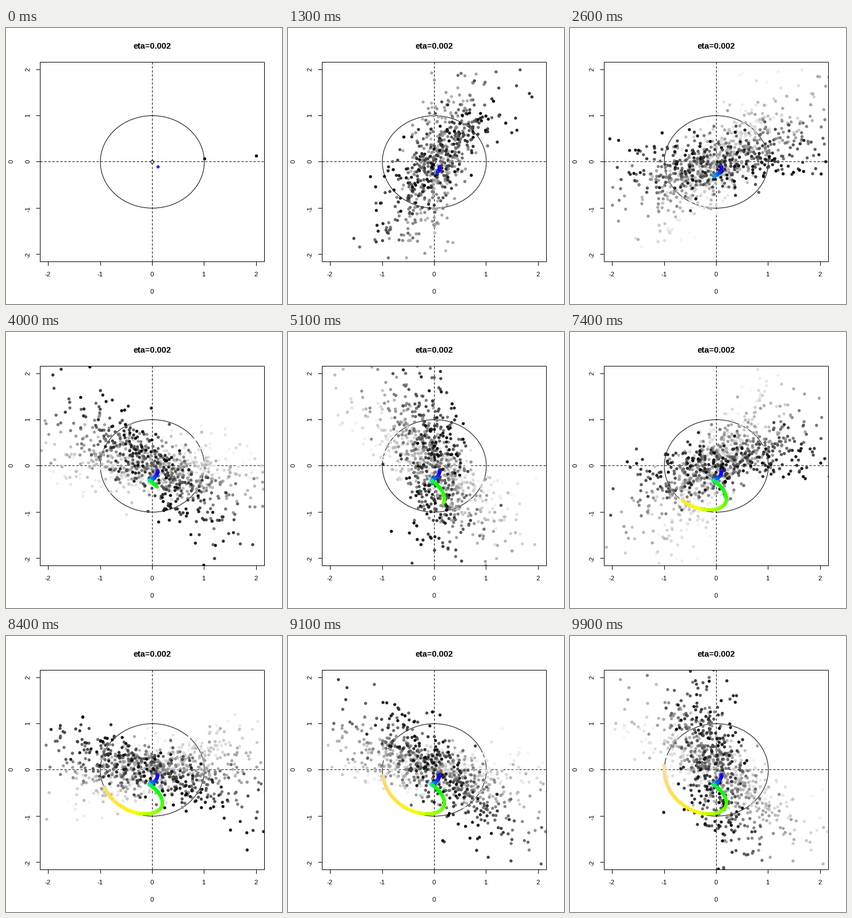
Animation, 480 px wide and 480 px high, one loop 10000 ms. Source, as a matplotlib script:

```python
import colorsys

import matplotlib.pyplot as plt
import numpy as np
from matplotlib.animation import FuncAnimation
from matplotlib.patches import Ellipse, Rectangle

SIZE, DPI = 480, 100
FRAMES, STEP_MS = 100, 100
ETA = 0.002
PER_FRAME, WINDOW = 50, 20      # new samples per frame, frames a sample stays
STRIDE = 5                      # draw every fifth weight update
SPREAD = np.array([1.0, 0.28])  # deviation along and across the main axis
START = (0.1, -0.1)
PX = 72 / DPI                   # one pixel in points

LEFT, TOP, RIGHT, BOTTOM = 59, 59, 449, 406
CX, CY, UX, UY = 254.5, 232.9, 90.4, 80.4


def to_px(points):
    return np.asarray(points) * (UX, -UY) + (CX, CY)


def axis_at(t):
    """Unit vectors along and across the cloud, turning once per loop."""
    a = np.pi / 2 - 2 * np.pi * np.asarray(t) / FRAMES
    c, s = np.cos(a), np.sin(a)
    return np.stack([c, s], axis=-1), np.stack([-s, c], axis=-1)


def learn():
    """Oja's rule, driven by the expected covariance of the cloud."""
    w = np.array(START)
    path = [w]
    for k in range((FRAMES - 1) * PER_FRAME):
        along, across = axis_at(k / PER_FRAME)
        cw = SPREAD[0] ** 2 * (along @ w) * along + SPREAD[1] ** 2 * (across @ w) * across
        w = w + ETA * (cw - (w @ cw) * w)
        path.append(w)
    return np.array(path)[::STRIDE]


def topo(p):
    """Violet to cyan, green to yellow, yellow to cream."""
    part = min(int(p * 3), 2)
    u = p * 3 - part
    hue = (43 - 12 * u, 23 - 12 * u, 10 - 4 * u)[part]
    return colorsys.hsv_to_rgb(hue / 60, 1 - 0.7 * u * (part == 2), 1)


rng = np.random.default_rng(7)
born = 1 + np.arange((FRAMES - 1) * PER_FRAME) / PER_FRAME
along, across = axis_at(born)
draws = rng.normal(0, SPREAD, (born.size, 2))
cloud = to_px(draws[:, :1] * along + draws[:, 1:] * across)

path = to_px(learn())
path_colors = np.array([topo(p) for p in np.linspace(0, 1, len(path))])
first_dots = to_px([(k, 0.07 * k) for k in (1, 2)])

fig = plt.figure(figsize=(SIZE / DPI, SIZE / DPI), dpi=DPI, facecolor="white")
ax = fig.add_axes([0, 0, 1, 1])
ax.set(xlim=(0, SIZE), ylim=(SIZE, 0))
ax.axis("off")


def line(x, y, **kw):
    ax.plot(x, y, color="black", lw=PX, solid_capstyle="butt", **kw)


def label(x, y, text, size=11.4, **kw):
    ax.text(x, y, text, family="Liberation Sans", fontsize=size * PX,
            ha="center", va="center_baseline", **kw)


# Straight lines sit on whole pixels, which the renderer snaps to
frame = Rectangle((LEFT, TOP), RIGHT - LEFT, BOTTOM - TOP, fill=False,
                  ec="black", lw=PX, zorder=6)
ax.add_patch(frame)
for v in range(-2, 3):
    tx, ty = int(CX + UX * v), int(CY - UY * v)
    line([tx, tx], [BOTTOM, BOTTOM + 7])
    line([LEFT - 7, LEFT], [ty, ty])
    label(tx - 0.5, 428.5, str(v))
    label(38.5, ty + 0.5, str(v), rotation=90)
label(254, 457.5, "0")
label(9.5, 232.5, "0", rotation=90)
label(254, 30, "eta=0.002", size=14.4, weight="bold")

dash = dict(dashes=(4, 3), dash_capstyle="butt", zorder=2)
line([int(CX)] * 2, [BOTTOM, TOP], **dash)
line([LEFT, RIGHT], [int(CY)] * 2, **dash)
ax.add_patch(Ellipse((CX, CY), 2 * UX, 2 * UY, fill=False, ec="black",
                     lw=PX, zorder=2))
ax.scatter([CX], [CY], s=(5.5 * PX) ** 2, facecolors="none",
           edgecolors="black", linewidths=PX, zorder=2)

dots = ax.scatter([], [], s=(5.4 * PX) ** 2, linewidths=0, zorder=3)
trail = ax.scatter([], [], s=(5.6 * PX) ** 2, linewidths=0, zorder=4)
for art in (dots, trail):
    art.set_clip_path(frame)


def draw(i):
    if i == 0:
        dots.set_offsets(first_dots)
        dots.set_facecolors("black")
    else:
        age = (i + 1 - born) / WINDOW
        live = (age > 0) & (age <= 1)
        shade = age[live, None] ** 0.7
        dots.set_offsets(cloud[live])
        dots.set_facecolors(np.repeat(shade, 3, axis=1))
    n = i * PER_FRAME // STRIDE + 1
    trail.set_offsets(path[:n])
    trail.set_facecolors(path_colors[:n])
    return dots, trail


anim = FuncAnimation(fig, draw, frames=FRAMES, interval=STEP_MS, repeat=True,
                     repeat_delay=0, init_func=lambda: draw(0))
plt.show()
```
